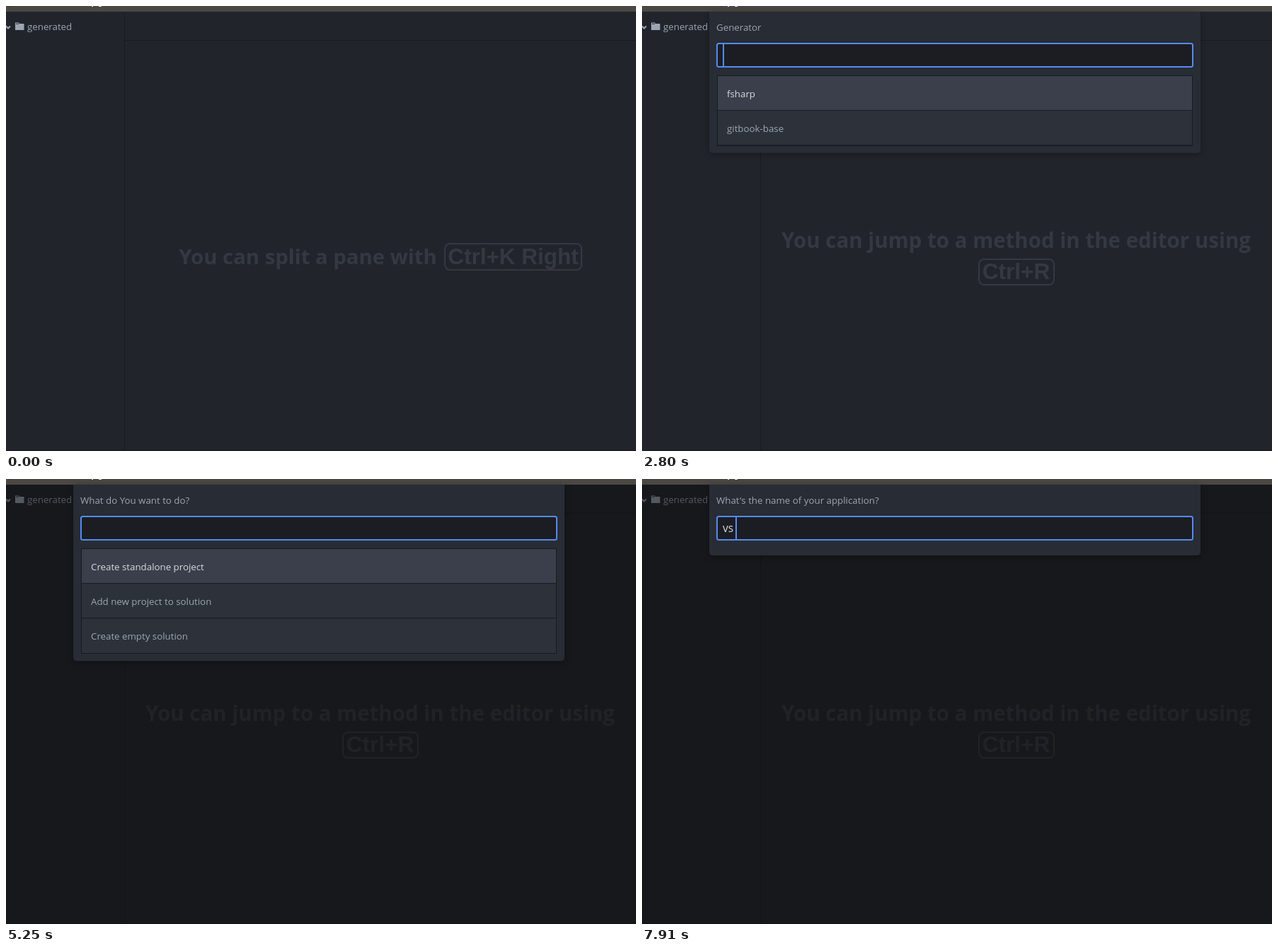
An HTML page that plays this animation: 890x629 px, repeating every 8000 ms.

```html
<!DOCTYPE html>
<html lang="en">
<head>
<meta charset="utf-8">
<title>Editor command palette</title>
<style>
  html, body { margin: 0; width: 100%; height: 100%; overflow: hidden; background: #21252b; }
  svg { display: block; width: 890px; height: 629px; font: 13.3px "Open Sans", "Noto Sans", sans-serif; }
  text { fill: #9da5b4; white-space: pre; }
  .bright, .match { fill: #d7dae0; }
  .match { font-weight: 700; }
  .query { fill: #d7dae0; font-size: 15.4px; }
  .key { letter-spacing: 1.75px; }
  .tip { fill: #343941; font-weight: 700; text-anchor: middle; }
  .tip-key { font: 700 31.5px "Liberation Sans", Arial, sans-serif; }
  #panel > path { filter: drop-shadow(0 2px 4px rgba(0, 0, 0, .35)); }
</style>
</head>
<body>
<svg viewBox="0 0 890 629">
  <rect width="890" height="629" fill="#21252b"/>
  <path d="M167.5 8V629M167 48.5H890M0 628.5H890" stroke="#181a1f" fill="none"/>
  <path d="M0 28.5L3 31.5L6 28.5" stroke="#9da5b4" stroke-width="2" fill="none"/>
  <path d="M13 23.5h5.5v1.5h7v9h-12.5z" fill="#9da5b4"/>
  <path d="M14 25.2h4" stroke="#21252b"/>
  <text x="30" y="34">generated</text>
  <g id="tip"></g>
  <rect id="dim" y="8" width="890" height="621" fill="#0c0d0f"/>
  <rect width="890" height="8" fill="#4b4844"/>
  <path d="M3 0h7" stroke="#33312e"/>
  <path d="M121 0h2M131 0h4" stroke="#f2f0ec" stroke-width="2"/>
  <clipPath id="clip"><rect id="clipRect" x="106" width="672"/></clipPath>
  <g id="panel"></g>
</svg>
<script>
const LOOP = 8000, STEP = 70, FADE = 240, ROW = 49.4;
const $ = id => document.getElementById(id);

const palette = {
  rows: ['About: View Release Notes', 'Advanced Open File: Toggle|Ctrl+Alt+O', 'Application: About',
    'Application: Add Project Folder|Ctrl+Alt+O', 'Application: Bring All Viewers To Front', 'Application: Hide'],
  thumb: 9
};
const openYour = ['Config', 'Keymap', 'Snippets', 'Stylesheet', 'Init Script'];
// Square brackets mark the matched letters.
const filtered = (yo) => ({
  rows: [yo + ': Yeoman|Ctrl+Alt+Y', ...openYour.map(s => `Application: Open ${yo}ur ${s}`)],
  thumb: 66
});
const generator = { title: 'Generator', rows: ['fsharp', 'gitbook-base'] };
const action = {
  title: 'What do You want to do?',
  rows: ['Create standalone project', 'Add new project to solution', 'Create empty solution']
};
const appType = {
  title: 'What type of application do you want to create?',
  rows: ['Console Application', 'Class Library', 'Portable Class Library (Profile 259)',
    'Doravel (WPF) Application', 'ASP.Net Web API 2 Application', 'Suave Application'],
  thumb: 107
};
const appName = { title: "What's the name of your application?", rows: [] };

const scenes = [
  { at: 0 },
  { at: 1120, opened: 1120, panel: palette, query: '' },
  { at: 2100, opened: 1120, panel: palette, query: 'y' },
  { at: 2170, opened: 1120, panel: filtered('[Y]o'), query: 'yo' },
  { at: 2240, opened: 1120, panel: filtered('[Yo]'), query: 'yo' },
  { at: 2730, opened: 1120, panel: palette, query: '' },
  { at: 2800, opened: 2800, panel: generator, query: '' },
  { at: 3920 },
  { at: 4130, opened: 4130, panel: action, query: '' },
  { at: 5390, opened: 5390, panel: appType, query: '' },
  { at: 6370, opened: 6370, panel: appName, query: 'console1', selected: true },
  { at: 7700, opened: 6370, panel: appName, query: 'v' },
  { at: 7910, opened: 6370, panel: appName, query: 'vs' }
];
const caretOff = [[1610, 1960], [2590, 2730], [3150, 3500], [4480, 4830], [5250, 5390], [5740, 6090]];

const rect = (x, y, w, h, fill, more = '') =>
  `<rect x="${x}" y="${y}" width="${w}" height="${h}" fill="${fill}" ${more}/>`;
const text = (x, y, s, cls = '') => `<text x="${x}" y="${y}" class="${cls}">${s}</text>`;
const markMatch = s => s.replace(/\[(\w+)\]/, '<tspan class="match">$1</tspan>');

function tipMarkup(first) {
  const box = (x, y, w, h) => rect(x, y, w, h, 'none', 'rx="7" stroke="#343941" stroke-width="2"');
  const line = (x, y, s, size) => `<text x="${x}" y="${y}" class="tip" font-size="${size}">${s}</text>`;
  return first
    ? line(426.5, 365, 'You can split a pane with', 29.3) + box(620, 336, 193, 37) +
      text(716.5, 365, 'Ctrl+K Right', 'tip tip-key')
    : line(528.5, 342, 'You can jump to a method in the editor using', 29.5) + box(476, 358, 106, 36) +
      text(528.5, 386, 'Ctrl+R', 'tip tip-key');
}

function rowMarkup(row, i, top, width) {
  const [label, key] = row.split('|');
  const y = top + i * ROW, active = i === 0, tone = active ? 'bright' : '';
  let out = rect(107, y, width, ROW, active ? '#3a3f4b' : '#2c313a') +
    rect(107, Math.round(y + ROW - 1), width, 1, '#181a1f') +
    text(120, Math.round(y + 30), markMatch(label), tone);
  if (key) {
    const x = key.endsWith('Y') ? 669.5 : 666.5, ky = Math.round(y + 10) - .5;
    out += rect(x, ky, 760.5 - x, 29, active ? '#484e5b' : '#3a3f4b', 'rx="2" stroke="#525865"') +
      text(x + 6, ky + 20, key, 'key ' + tone);
  }
  return out;
}

function panelMarkup({ panel, query, selected }, caret) {
  const { title, rows, thumb } = panel;
  const shift = title ? 35 : 0, top = 64 + shift - (title ? .5 : 0);
  const height = thumb ? 269 : rows.length * ROW;
  const bottom = rows.length ? top + height + 10.5 : 108;
  let out = `<path d="M95 8H789V${bottom - 5}q0 5-5 5H100q-5 0-5-5z" fill="#282c34"/>`;
  if (title) out += text(105, 35, title);
  out += rect(106, 18 + shift, 672, 33, '#1b1d23', 'rx="2.5" stroke="#568af2" stroke-width="2"');
  if (selected) out += rect(114, 19 + shift, 62, 31, '#3e4451');
  out += text(114, 40 + shift, query, 'query');
  if (caret) out += rect(114 + 9 * query.length, 19 + shift, 2, 31, '#568af2');
  if (rows.length) {
    const width = thumb ? 662 : 670;
    $('clipRect').setAttribute('y', top - .5);
    $('clipRect').setAttribute('height', height);
    out += '<g clip-path="url(#clip)">' + rect(106, top, 672, height, '#21252b') +
      rows.map((row, i) => rowMarkup(row, i, top, width)).join('') + '</g>';
    if (thumb) out += rect(771, top + 3, 4, thumb, '#3a3f4b', 'rx="2"');
    out += rect(106.5, Math.round(top) - .5, 671, Math.round(height), 'none', 'stroke="#181a1f"');
  }
  return out;
}

let shownTip, shownPanel;
function render(t) {
  const scene = scenes.findLast(s => s.at <= t);
  const caret = !scene.selected && !caretOff.some(([from, to]) => t >= from && t < to);

  const firstTip = t < 2800;
  if (firstTip !== shownTip) $('tip').innerHTML = tipMarkup(shownTip = firstTip);

  const elapsed = Math.floor((t - scene.opened) / STEP) * STEP;
  const progress = Math.min(1, elapsed / FADE);
  $('dim').setAttribute('opacity', scene.panel ? .5 * (1 - (1 - progress) ** 3) : 0);

  const state = scene.at + ':' + caret;
  if (state !== shownPanel) {
    shownPanel = state;
    $('panel').innerHTML = scene.panel ? panelMarkup(scene, caret) : '';
  }
}

const start = performance.now();
function tick() {
  render((performance.now() - start) % LOOP);
  requestAnimationFrame(tick);
}
tick();
</script>
</body>
</html>
```
